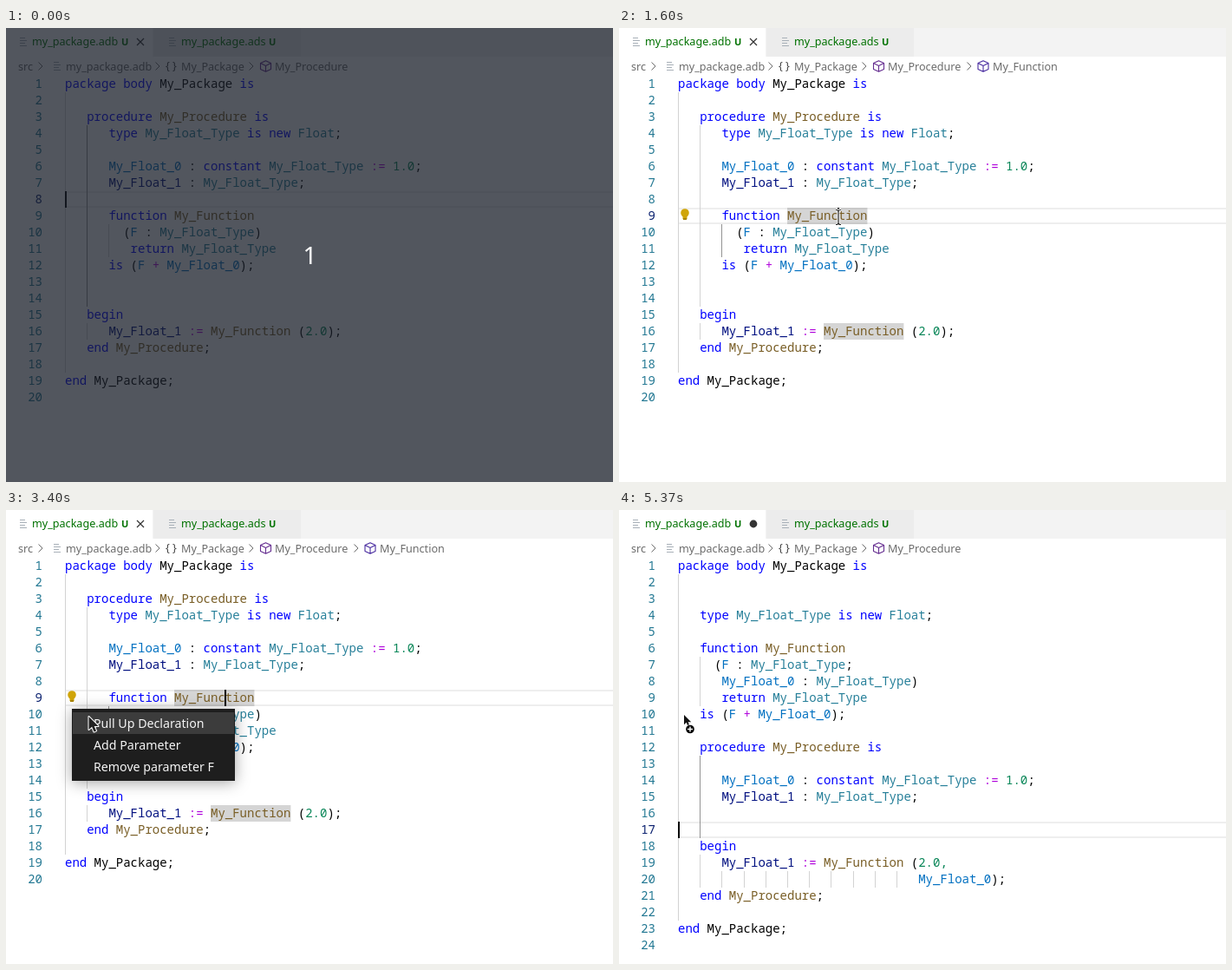
An HTML page with a canvas that plays this animation: 700x523 px, repeating every 5.73 s.

```html
<!DOCTYPE html>
<html lang="en">
<head>
<meta charset="utf-8">
<title>Pull Up Declaration</title>
<style>
html, body { margin: 0; width: 100%; height: 100%; overflow: hidden; background: #fff; }
canvas { display: block; }
</style>
</head>
<body>
<canvas id="stage" width="700" height="523"></canvas>
<script>
const ctx = document.getElementById('stage').getContext('2d');
const LOOP = 5730, LEFT = 68, CHAR = 8.4, ROW = 19, TOP = 55;
const MONO = '500 14px "Noto Sans Mono", monospace';
const UI = '12.6px "Noto Sans", sans-serif';
const BADGE = '600 11px "Noto Sans", sans-serif';
const MENU = '14.2px "Noto Sans", sans-serif';
const GREEN = '#007100', GRAY = '#6c6c6c';

const before = `package body My_Package is

   procedure My_Procedure is
      type My_Float_Type is new Float;

      My_Float_0 : constant My_Float_Type := 1.0;
      My_Float_1 : My_Float_Type;

      function My_Function
        (F : My_Float_Type)
         return My_Float_Type
      is (F + My_Float_0);


   begin
      My_Float_1 := My_Function (2.0);
   end My_Procedure;

end My_Package;
`.split('\n');

const after = `package body My_Package is


   type My_Float_Type is new Float;

   function My_Function
     (F : My_Float_Type;
      My_Float_0 : My_Float_Type)
      return My_Float_Type
   is (F + My_Float_0);

   procedure My_Procedure is

      My_Float_0 : constant My_Float_Type := 1.0;
      My_Float_1 : My_Float_Type;


   begin
      My_Float_1 := My_Function (2.0,
                                 My_Float_0);
   end My_Procedure;

end My_Package;
`.split('\n');

// Syntax colours return first after an edit, then the semantic ones.
const syntax = [
  [/^(package|body|is|procedure|type|new|constant|function|return|begin|end)$/, '#0000ff'],
  [/^\d/, '#098658'],
  [/^(:=|\+)$/, '#af00db'],
];
const semantic = [
  [/^(My_Float_Type|Float)$/, '#267f99'],
  [/^(My_Function|My_Procedure)$/, '#795e26'],
  [/^(My_Float_0|F)$/, '#0070c1'],
  [/^My_Float_1$/, '#001080'],
];

// Moments when the text caret flips between shown and hidden
const blinks = [270, 770, 1270, 1330, 1830, 2330, 2900, 3400, 4030, 4530, 5070, 5340];

// Pointer path: time, x, y
const path = [
  [530, 659, 214], [700, 400, 222], [850, 272, 225], [930, 257, 222], [1070, 253, 218],
  [1830, 253, 218], [1960, 212, 220], [2130, 112, 217], [2290, 76, 211],
  [3070, 76, 211], [3300, 95.5, 238], [3800, 95.5, 238], [4030, 80, 240],
  [4170, 80, 240], [4200, 75, 240], [LOOP, 75, 240],
];

const shapes = {
  arrow: new Path2D('M0 0V15L3.6 11.8 6 17.5 8.6 16.4 6.2 10.9H11Z'),
  hand: new Path2D('M-1.7 .4Q0-1.4 1.7 .4V5H8Q10.5 5.5 10.5 8V12Q10 15 8 15H1L-4.5 9Q-4 6.5-1.7 8Z'),
  beam: new Path2D('M-3-8.5Q0-8.5 0-6.5Q0-8.5 3-8.5M0-7V7M-3 8.5Q0 8.5 0 6.5Q0 8.5 3 8.5'),
  cube: new Path2D('M0-6.3 6-3.4V3.4L0 6.3-6 3.4V-3.4ZM-6-3.4 0-.4 6-3.4M0-.4V6.3'),
  chevron: new Path2D('M-2.5-4.5 2-0-2.5 4.5'),
  cross: new Path2D('M-4-4 4 4M4-4-4 4'),
  plus: new Path2D('M-3 0H3M0-3V3'),
  file: new Path2D('M-4-4H2M-4-1H4M-4 2H2M-4 5H4'),
};

function rect(x, y, w, h, color) {
  ctx.fillStyle = color;
  ctx.fillRect(x, y, w, h);
}

function text(s, x, y, font, color, align = 'left') {
  ctx.font = font;
  ctx.fillStyle = color;
  ctx.textAlign = align;
  ctx.fillText(s, x, y);
}

function disc(x, y, r, color) {
  ctx.fillStyle = color;
  ctx.beginPath();
  ctx.arc(x, y, r, 0, 7);
  ctx.fill();
}

function line(shape, x, y, color, width = 1, fill) {
  ctx.save();
  ctx.translate(x, y);
  ctx.lineWidth = width;
  ctx.strokeStyle = color;
  ctx.lineJoin = 'round';
  ctx.stroke(shapes[shape]);
  if (fill) {
    ctx.fillStyle = fill;
    ctx.fill(shapes[shape]);
  }
  ctx.restore();
}

const rowY = n => TOP + (n - 1) * ROW;
const colX = n => LEFT + n * CHAR;

function drawTabs(dirty) {
  rect(0, 0, 700, 33, '#f3f3f3');
  rect(0, 0, 169, 33, '#fff');
  rect(170, 0, 170, 33, '#ececec');
  [[20, 'my_package.adb', 30, 133], [192, 'my_package.ads', 202, 303]].forEach(([icon, name, x, badge]) => {
    line('file', icon, 15.5, '#a8b0b8');
    text(name, x, 20, UI, GREEN);
    text('U', badge, 20, BADGE, GREEN);
  });
  if (dirty) disc(155, 16, 4.4, '#333');
  else line('cross', 155, 16, '#333', 1.2);
}

function drawCrumbs(inFunction) {
  const crumb = (s, x) => text(s, x, 49, UI, GRAY);
  const next = x => line('chevron', x, 44, GRAY);
  crumb('src', 14);
  next(40);
  line('file', 59, 43.5, '#a8b0b8');
  crumb('my_package.adb', 69);
  next(175);
  text('{', 184, 48, UI, '#444');
  text('}', 192, 48, UI, '#444');
  crumb('My_Package', 202);
  next(283);
  line('cube', 299.5, 44, '#652d90', 1.1);
  crumb('My_Procedure', 310);
  if (!inFunction) return;
  next(404);
  line('cube', 420, 44, '#4a2da0', 1.1);
  crumb('My_Function', 431);
}

// Indent guide at a depth of three columns each, from one row to another
function guide(depth, from, to, active) {
  rect(Math.round(colX(depth * 3)), rowY(from), 1, (to - from + 1) * ROW, active ? '#939393' : '#d3d3d3');
}

function drawGuides(edited, inFunction) {
  guide(0, 2, edited ? 22 : 18);
  if (edited) {
    guide(1, 7, 9);
    guide(1, 13, 17, true);
    guide(1, 19, 20);
    for (let d = 2; d <= 10; d++) guide(d, 20, 20);
  } else {
    guide(1, 4, 14, !inFunction);
    guide(1, 16, 16);
    guide(2, 10, 11, inFunction);
  }
}

// Colour rules for a row: inserted text starts plain, the moved heading keeps its name's colour.
function rulesFor(lines, n, level) {
  const all = [...syntax, ...semantic];
  if (lines === before || level === 2) return all;
  if (n === 12) return level ? all : semantic;
  const fresh = n >= 4 && n <= 10 || n === 20;
  return !fresh ? all : level ? syntax : [];
}

function drawCode(lines, current, level) {
  lines.forEach((s, i) => {
    const n = i + 1, y = rowY(n) + 14;
    const rules = rulesFor(lines, n, level);
    text(n, 42, y, MONO, n === current ? '#0b216f' : '#237893', 'right');
    for (const m of s.matchAll(/\d[\d.]*,?|\w+|:=|[^\s\w]/g)) {
      const rule = rules.find(r => r[0].test(m[0]));
      text(m[0], colX(m.index), y, MONO, rule ? rule[1] : '#000');
    }
  });
}

function drawBulb() {
  disc(76, 213, 4.8, '#d0a509');
  rect(73.5, 216, 5, 4, '#d0a509');
  rect(74, 219, 4, 2, '#a98500');
}

function drawMenu(hover) {
  ctx.save();
  ctx.shadowColor = 'rgba(0,0,0,.36)';
  ctx.shadowBlur = 16;
  ctx.shadowOffsetY = 2;
  rect(76, 229, 188, 83, '#1e1e1e');
  ctx.restore();
  if (hover) rect(77, 233, 186, 25, '#3c3c3c');
  ['Pull Up Declaration', 'Add Parameter', 'Remove parameter F'].forEach((s, i) =>
    text(s, 101, 251 + i * 25, MENU, '#f5f5f5'));
}

function pointerAt(t) {
  const i = path.findIndex(p => p[0] > t);
  const [a, b] = [path[i - 1], path[i]];
  const k = (t - a[0]) / (b[0] - a[0]);
  return [a[1] + (b[1] - a[1]) * k, a[2] + (b[2] - a[2]) * k];
}

function drawPointer(t, x, y) {
  if (t >= 5330) {
    ctx.save();
    ctx.translate(75, 236);
    ctx.scale(.75, .75);
    line('arrow', 0, 0, '#fff', 2, '#111');
    ctx.restore();
    disc(82, 252.5, 5.5, '#fff');
    disc(82, 252.5, 4.8, '#000');
    line('plus', 82, 252.5, '#fff', 1.4);
  } else if (t >= 2930 && t < 3530) {
    line('arrow', x, y, '#fff', 2, '#222');
  } else if (t > 1830 && t < 2930 && x < 86) {
    line('hand', x, y, '#fff', 2, '#222');
  } else {
    line('beam', x, y, '#fff', 3);
    line('beam', x, y, '#222', 1.2);
  }
}

function draw(t) {
  const edited = t >= 3570;
  const clicked = t >= 1330 && !edited;
  const current = edited ? 17 : clicked ? 9 : 8;
  const level = t < 3600 ? 0 : t < 3870 ? 1 : 2;

  rect(0, 0, 700, 523, '#fff');
  drawTabs(edited);
  drawCrumbs(t >= 1470 && t < 3830);

  const y = rowY(current);
  rect(LEFT, y, 632, 2, '#eee');
  rect(LEFT, y + ROW - 2, 632, 2, '#eee');
  if (t >= 1600 && !edited) {
    rect(colX(15), rowY(9), 11 * CHAR, ROW, '#57575740');
    rect(colX(20), rowY(16), 11 * CHAR, ROW, '#57575740');
  }
  drawGuides(edited, clicked);
  drawCode(edited ? after : before, current, level);
  if (blinks.filter(b => b <= t).length % 2 === 0) rect(clicked ? 252 : LEFT, y, 2, ROW, '#000');
  if (t >= 1600 && t < 3600) drawBulb();

  if (t >= 530) {
    const [px, py] = pointerAt(t);
    if (t >= 2400 && t < 3530) drawMenu(py > 233);
    drawPointer(t, px, py);
  }
  if (t < 30) {
    rect(0, 0, 700, 523, 'rgba(25,30,40,.75)');
    text('1', 350.5, 272, '28px "Noto Sans", sans-serif', '#fff', 'center');
  }
}

const start = performance.now();
function tick() {
  draw((performance.now() - start) % LOOP);
  requestAnimationFrame(tick);
}
tick();
</script>
</body>
</html>
```
